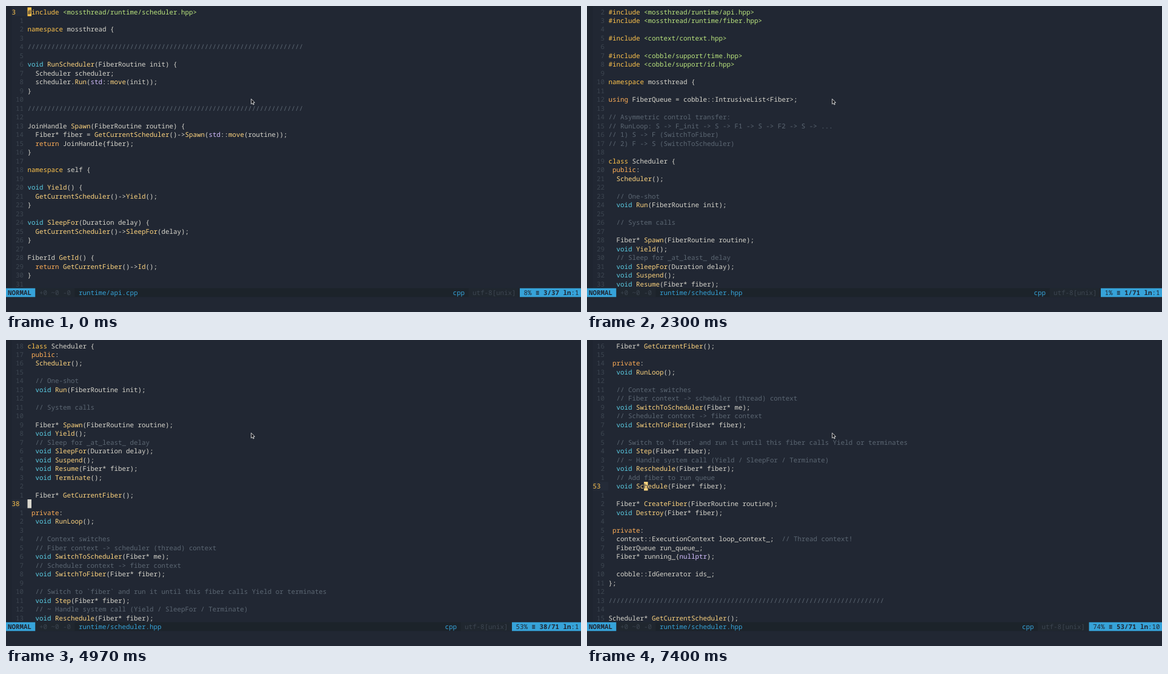
Write an HTML page with a canvas that moves like this. It is 949 by 505 pixels and loops after 8000 ms.

```html
<!DOCTYPE html>
<html lang="en">
<head>
<meta charset="utf-8">
<title>Editor session</title>
<style>
html, body { margin: 0; width: 100%; height: 100%; overflow: hidden; background: #212733; }
canvas { display: block; width: 949px; height: 505px; }
</style>
</head>
<body>
<canvas id="stage"></canvas>
<script>
const W = 949, H = 505, LOOP = 8000;
const CW = 6.5, RH = 14.484, X0 = 35.5, Y0 = 2.3, ROWS = 32;
const FONT = '10.833px "Noto Sans Mono", "DejaVu Sans Mono", monospace';
const COLOR = {
  bg: '#212733', sign: '#1f2530', line: '#242b38', guide: '#3d4651',
  fg: '#d9d7ce', comment: '#5c6773', string: '#bbe67e', func: '#ffd57f',
  keyword: '#ffae57', special: '#ffc44c', type: '#5ccfe6', constant: '#d4bfff',
  blue: '#36a3d9', bar: '#1c232a', side: '#20272f'
};
const RULE = '/'.repeat(70);

// Both listings begin at line 3; the first two lines are above the view.
const api = {
  name: 'runtime/api.cpp', total: 37,
  lines: `#include <mossthread/runtime/scheduler.hpp>

namespace mossthread {

${RULE}

void RunScheduler(FiberRoutine init) {
  Scheduler scheduler;
  scheduler.Run(std::move(init));
}

${RULE}

JoinHandle Spawn(FiberRoutine routine) {
  Fiber* fiber = GetCurrentScheduler()->Spawn(std::move(routine));
  return JoinHandle{fiber};
}

namespace self {

void Yield() {
  GetCurrentScheduler()->Yield();
}

void SleepFor(Duration delay) {
  GetCurrentScheduler()->SleepFor(delay);
}

FiberId GetId() {
  return GetCurrentFiber()->Id();
}
`.split('\n')
};

const sched = {
  name: 'runtime/scheduler.hpp', total: 71,
  lines: `#include <mossthread/runtime/api.hpp>
#include <mossthread/runtime/fiber.hpp>

#include <context/context.hpp>

#include <cobble/support/time.hpp>
#include <cobble/support/id.hpp>

namespace mossthread {

using FiberQueue = cobble::IntrusiveList<Fiber>;

// Asymmetric control transfer:
// RunLoop: S -> F_init -> S -> F1 -> S -> F2 -> S -> ...
// 1) S -> F (SwitchToFiber)
// 2) F -> S (SwitchToScheduler)

class Scheduler {
 public:
  Scheduler();

  // One-shot
  void Run(FiberRoutine init);

  // System calls

  Fiber* Spawn(FiberRoutine routine);
  void Yield();
  // Sleep for _at_least_ delay
  void SleepFor(Duration delay);
  void Suspend();
  void Resume(Fiber* fiber);
  void Terminate();

  Fiber* GetCurrentFiber();

 private:
  void RunLoop();

  // Context switches
  // Fiber context -> scheduler (thread) context
  void SwitchToScheduler(Fiber* me);
  // Scheduler context -> fiber context
  void SwitchToFiber(Fiber* fiber);

  // Switch to \`fiber\` and run it until this fiber calls Yield or terminates
  void Step(Fiber* fiber);
  // ~ Handle system call (Yield / SleepFor / Terminate)
  void Reschedule(Fiber* fiber);
  // Add fiber to run queue
  void Schedule(Fiber* fiber);

  Fiber* CreateFiber(FiberRoutine routine);
  void Destroy(Fiber* fiber);

 private:
  context::ExecutionContext loop_context_;  // Thread context!
  FiberQueue run_queue_;
  Fiber* running_{nullptr};

  cobble::IdGenerator ids_;
};

${RULE}

Scheduler* GetCurrentScheduler();`.split('\n')
};

// Key presses: [time, changed fields]
const keys = [
  [0, { file: api, top: 3, line: 3, col: 0, cmd: '' }],
  [430, { col: 1 }],
  [730, { col: 2 }], [770, { col: 4 }], [800, { col: 5 }], [830, { col: 6 }], [870, { col: 8 }],
  [1400, { col: 21 }], [1530, { col: 29 }],
  [1800, { col: 31 }], [1870, { col: 33 }],
  [2230, { cmd: 'g' }],
  [2300, { file: sched, line: 1, col: 0, cmd: '' }],
  [3270, { line: 2 }],
  [3600, { line: 3 }], [3700, { line: 8 }], [3770, { line: 12 }], [3870, { line: 17 }], [3970, { line: 21 }],
  [4970, { top: 20, line: 38 }],
  [5430, { top: 37, line: 55 }],
  [6570, { line: 54 }], [6630, { line: 53 }],
  [6930, { col: 1 }],
  [7230, { col: 2 }], [7300, { col: 5 }], [7400, { col: 9 }]
];

const canvas = document.getElementById('stage');
const ctx = canvas.getContext('2d');
const dpr = window.devicePixelRatio || 1;
canvas.width = Math.round(W * dpr);
canvas.height = Math.round(H * dpr);

const colX = c => X0 + c * CW;
const rowY = r => Y0 + r * RH;

function box(x, y, w, h, color) {
  ctx.fillStyle = color;
  ctx.fillRect(x, y, w, h);
}

function put(text, col, row, color, bold) {
  ctx.font = (bold ? 'bold ' : '') + FONT;
  ctx.fillStyle = color;
  ctx.fillText(text, colX(col), rowY(row) + 11.2);
}

function wordColor(word, next) {
  if (/^(namespace|class)$/.test(word)) return COLOR.special;
  if (/^(using|return|public|private)$/.test(word)) return COLOR.keyword;
  if (word === 'void') return COLOR.type;
  if (/^(std|nullptr)$/.test(word)) return COLOR.constant;
  return next === '(' ? COLOR.func : COLOR.fg;
}

// Splits a line into [column, text, color] runs.
function tokens(line) {
  if (line.startsWith('#include')) {
    return [[0, '#include', COLOR.special], [9, line.slice(9), COLOR.string]];
  }
  return [...line.matchAll(/\/\/.*|\w+|[^\w\s/]+/g)].map(m => {
    const text = m[0];
    const color = text.startsWith('//') ? COLOR.comment
      : /^\w/.test(text) ? wordColor(text, line[m.index + text.length]) : COLOR.fg;
    return [m.index, text, color];
  });
}

function drawCursor(s, runs, row) {
  const run = runs.find(([c, text]) => s.col >= c && s.col < c + text.length);
  box(colX(s.col), rowY(row), CW, RH, run ? run[2] : COLOR.fg);
  if (run) put(run[1][s.col - run[0]], s.col, row, COLOR.bg);
}

function drawCode(s) {
  box(0, 0, colX(-4), rowY(ROWS), COLOR.sign);
  for (let row = 0; row < ROWS; row++) {
    const n = s.top + row;
    const runs = tokens(s.file.lines[n - 3] || '');
    const current = n === s.line;
    if (current) {
      box(colX(-4), rowY(row), 4 * CW, RH, COLOR.line);
      put(String(n), -4, row, COLOR.special);
    } else {
      const label = String(Math.abs(n - s.line));
      put(label, -1 - label.length, row, COLOR.guide);
    }
    for (const [c, text, color] of runs) put(text, c, row, color);
    if (current) drawCursor(s, runs, row);
  }
  if (s.line < s.top) {
    box(colX(s.col), rowY(s.line - s.top), CW, RH, COLOR.fg);
  }
}

function drawStatus(s) {
  const y = rowY(ROWS);
  const fill = (from, to, color) => box(from, y, to - from, RH, color);
  const percent = Math.floor(100 * s.line / s.file.total) + '%';
  const place = s.line + '/' + s.file.total;
  const column = ':' + (s.col + 1);
  const start = 140 - (percent.length + 3 + place.length + 3 + column.length);

  fill(0, W, COLOR.bar);
  fill(0, colX(2), COLOR.blue);
  fill(colX(2), colX(12), COLOR.side);
  fill(colX(start - 14), colX(start - 1), COLOR.side);
  fill(colX(start - 1), W, COLOR.blue);

  put('NORMAL', -5, ROWS, COLOR.bg, true);
  put('+0 ~0 -0', 3, ROWS, COLOR.guide);
  put(s.file.name, 13, ROWS, COLOR.blue);
  put('cpp', start - 18, ROWS, COLOR.blue);
  put('utf-8[unix]', start - 13, ROWS, COLOR.guide);

  let c = start;
  put(percent, c, ROWS, COLOR.bg);
  c += percent.length + 1;
  put('≡', c, ROWS, COLOR.bg, true);
  c += 2;
  put(place, c, ROWS, COLOR.bg, true);
  c += place.length + 1;
  put('ln', c, ROWS, COLOR.bg, true);
  put(column, c + 2, ROWS, COLOR.bg);
}

function drawPointer() {
  const pts = [[0, 0], [0, 8.6], [2, 6.9], [3.3, 9.7], [4.6, 9.1], [3.4, 6.4], [5.8, 6.1]];
  ctx.beginPath();
  for (const [x, y] of pts) ctx.lineTo(404.7 + x, 153.3 + y);
  ctx.closePath();
  ctx.fillStyle = '#111318';
  ctx.fill();
  ctx.lineWidth = 0.9;
  ctx.lineJoin = 'round';
  ctx.strokeStyle = '#e8e8e8';
  ctx.stroke();
}

function stateAt(t) {
  const s = {};
  for (const [time, change] of keys) if (time <= t) Object.assign(s, change);
  return s;
}

function draw(now) {
  const s = stateAt(now % LOOP);
  ctx.setTransform(dpr, 0, 0, dpr, 0, 0);
  ctx.textRendering = 'geometricPrecision';
  ctx.textBaseline = 'alphabetic';
  box(0, 0, W, H, COLOR.bg);
  drawCode(s);
  drawStatus(s);
  put(s.cmd, 130, 34, COLOR.fg);
  drawPointer();
}

const began = performance.now();
function tick() {
  draw(performance.now() - began);
  requestAnimationFrame(tick);
}
tick();
</script>
</body>
</html>
```
